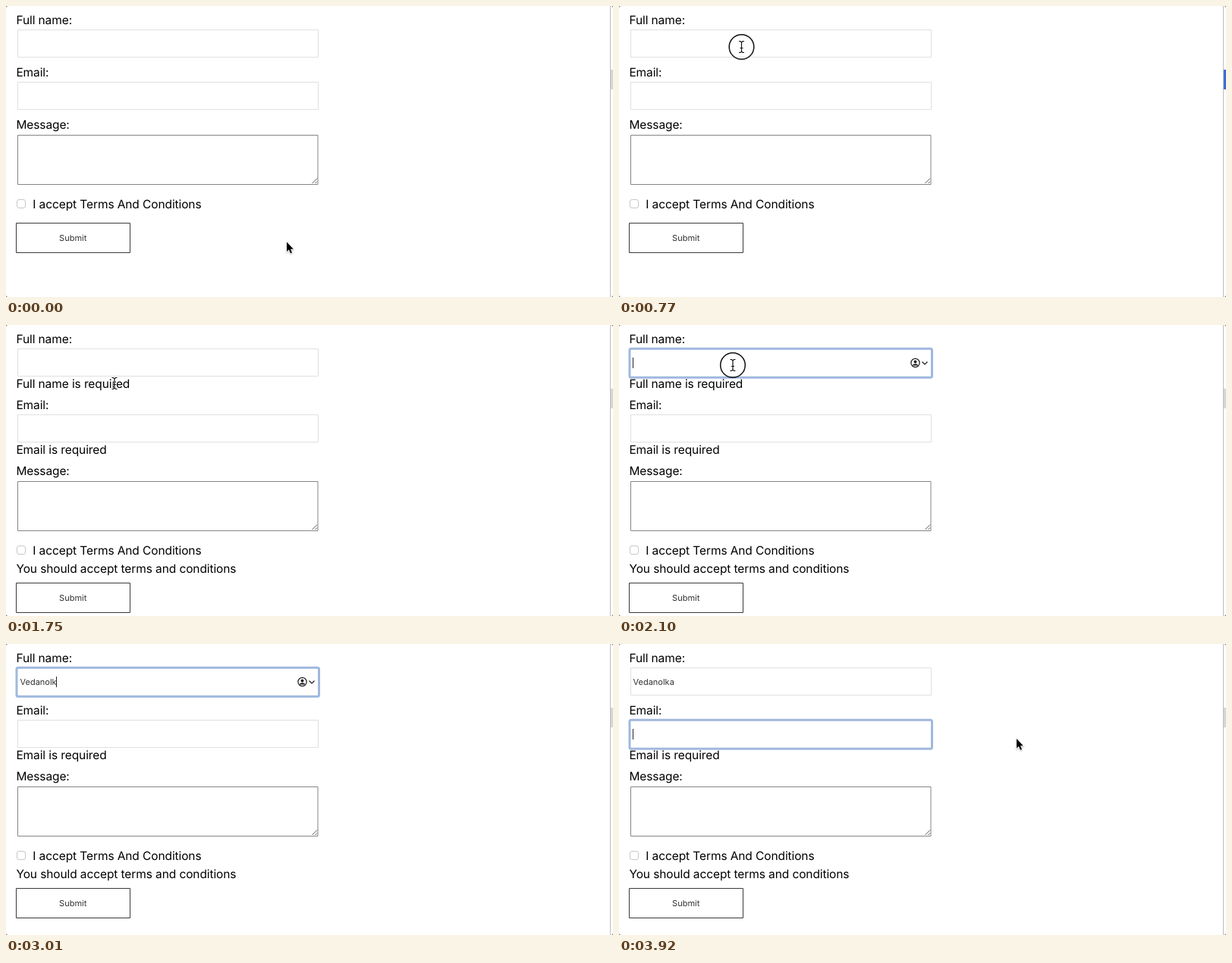
These frames come from a looping animation (800x384 px, 3.99 s). An HTML page with a canvas:

```html
<!DOCTYPE html>
<html lang="en">
<head>
<meta charset="utf-8">
<title>Form validation</title>
<style>
  html, body { margin: 0; width: 100%; height: 100%; overflow: hidden; background: #fff; }
  canvas { display: block; width: 800px; height: 384px; }
</style>
</head>
<body>
<canvas id="stage" width="800" height="384"></canvas>
<script>
const ctx = document.getElementById('stage').getContext('2d');
const WIDTH = 800, HEIGHT = 384, LOOP = 3990, STEP = 70;
const FONT = 'Inter, Roboto, sans-serif';
const LEFT = 13.4;
const NAME = 'Vedanolka';
const CLICK_TIME = 3 * STEP;

const typing = { start: 2240, end: 3080 };
const submitted = 1540;
const emailFocused = 3710;

// Pointer stops, each reached by an eased move from the one before
const origin = { x: 370, y: 311.5 };
const stops = [
  { leave: 0, arrive: 630, x: 161.5, y: 54, click: true },
  { leave: 980, arrive: 1330, x: 491, y: 191 },
  { leave: 1330, arrive: 1470, x: 112, y: 304, click: true },
  { leave: 1610, arrive: 1750, x: 143, y: 77 },
  { leave: 1750, arrive: 1960, x: 150, y: 53, click: true },
  { leave: 2940, arrive: 3570, x: 139.5, y: 118, click: true },
  { leave: emailFocused, arrive: 3920, x: 524, y: 125 }
];

const within = (t, from, to) => t >= from && t < to;
const clamp = v => Math.min(1, Math.max(0, v));
const ease = p => p * p * p * (p * (6 * p - 15) + 10);

function pointerAt(t) {
  let { x, y } = origin;
  for (const s of stops) {
    const k = ease(clamp((t - s.leave) / (s.arrive - s.leave)));
    x += (s.x - x) * k;
    y += (s.y - y) * k;
  }
  return { x, y };
}

// Typing starts slowly and speeds up
function typedName(t) {
  if (t < typing.start) return '';
  const p = clamp((t - typing.start) / (typing.end - typing.start));
  return NAME.slice(0, 1 + Math.floor((NAME.length - 1) * p ** 1.6 + 0.35));
}

function label(str, y, x = LEFT) {
  ctx.font = '15.5px ' + FONT;
  ctx.letterSpacing = '-0.1px';
  ctx.fillStyle = '#000';
  ctx.fillText(str, x, y);
}

function smallText(str, x, y) {
  ctx.font = '11px ' + FONT;
  ctx.letterSpacing = '0px';
  ctx.fillStyle = '#333';
  ctx.fillText(str, x, y);
  return ctx.measureText(str).width;
}

function box(x, y, w, h, color, width = 1, radius = 0) {
  ctx.strokeStyle = color;
  ctx.lineWidth = width;
  ctx.beginPath();
  ctx.roundRect(x, y, w, h, radius);
  ctx.stroke();
}

function circle(x, y, r) {
  ctx.beginPath();
  ctx.arc(x, y, r, 0, 2 * Math.PI);
}

function at(x, y, paint) {
  ctx.save();
  ctx.translate(x, y);
  paint();
  ctx.restore();
}

// One labelled input; returns the height taken and its text area
function field(y, { title, text = '', focused, caret, error }) {
  const top = y + 7;
  label(title, y);
  if (focused) box(14, top + 0.25, 398.5, 38, '#a0b8de', 3, 2);
  else box(15.5, top + 0.5, 396, 36, '#e0e0e0');
  const end = smallText(text, 18.5, top + 23);
  if (caret) {
    ctx.fillStyle = '#222';
    ctx.fillRect(Math.round(18 + end), top + 12, 1, 14);
  }
  if (error) label(error, y + 59);
  const extra = error ? 18 : 0;
  return { height: 69 + extra, top, bottom: top + 37 + extra };
}

const shoulders = new Path2D('M-3.5 3.4a3.5 2.1 0 0 1 7 0z');
const chevron = new Path2D('M9-1.5l3.5 3.5 3.5-3.5');

function contactIcon() {
  ctx.strokeStyle = ctx.fillStyle = '#1a1a1a';
  ctx.lineWidth = 1.2;
  circle(0, 0, 5.6);
  ctx.stroke();
  circle(0, -1.5, 1.9);
  ctx.fill();
  ctx.fill(shoulders);
  ctx.stroke(chevron);
}

function form(t) {
  const failed = t >= submitted;
  const nameFocus = within(t, 840, submitted) || within(t, 2100, emailFocused);
  const emailFocus = t >= emailFocused;

  let y = 24;
  const name = field(y, {
    title: 'Full name:',
    text: typedName(t),
    focused: nameFocus,
    caret: nameFocus && !within(t, 1330, submitted),
    error: failed && t < typing.start && 'Full name is required'
  });
  if (nameFocus) at(390.5, 50, contactIcon);
  y += name.height;

  const email = field(y, {
    title: 'Email:',
    focused: emailFocus,
    caret: emailFocus,
    error: failed && 'Email is required'
  });
  y += email.height;

  label('Message:', y);
  box(15.5, y + 8.5, 395.5, 65, '#858585');
  at(410, y + 72, () => {
    ctx.strokeStyle = '#555';
    ctx.stroke(new Path2D('M-6.5 0L0-6.5M-2.5 0L0-2.5'));
  });
  y += 105;

  box(14.5, y - 11.5, 11, 11, '#c8c8c8', 1, 2.5);
  label('I accept Terms And Conditions', y, 35.3);
  if (failed) {
    label('You should accept terms and conditions', y + 24);
    y += 18;
  }

  box(13.5, y + 19.5, 150, 39, '#3a3a3a');
  ctx.textAlign = 'center';
  smallText('Submit', 88.2, y + 43);
  ctx.textAlign = 'left';

  return [name, email];
}

const arrowShape = new Path2D('M0 0V12.6L2.9 10 5 14.8 7 13.9 5 9.2H8.8z');

function arrow() {
  ctx.shadowColor = 'rgba(0,0,0,0.3)';
  ctx.shadowBlur = 2;
  ctx.shadowOffsetY = 1;
  ctx.strokeStyle = '#fff';
  ctx.lineWidth = 1.5;
  ctx.stroke(arrowShape);
  ctx.shadowColor = 'transparent';
  ctx.fillStyle = '#000';
  ctx.fill(arrowShape);
}

const beamShape = new Path2D(
  'M-3.5-7.5h2L0-6 1.5-7.5h2M-3.5 7.5h2L0 6l1.5 1.5h2M0-6V6M-2 1.5h4');

function beam() {
  ctx.strokeStyle = 'rgba(255,255,255,0.8)';
  ctx.lineWidth = 2.6;
  ctx.stroke(beamShape);
  ctx.strokeStyle = '#111';
  ctx.lineWidth = 1.2;
  ctx.stroke(beamShape);
}

function pointer(t, fields) {
  // Hidden while typing
  if (within(t, typing.start, 3360)) return;
  const { x, y } = pointerAt(t);
  const overText = x < 412 && fields.some(f => within(y, f.top, f.bottom));
  at(x, y, overText ? beam : arrow);

  const click = stops.find(s => s.click && within(t, s.arrive, s.arrive + CLICK_TIME));
  if (!click) return;
  circle(x, y, 9 + 7.3 * (t - click.arrive) / (CLICK_TIME - STEP));
  ctx.strokeStyle = '#111';
  ctx.lineWidth = 1.5;
  ctx.stroke();
}

function windowEdge(t) {
  ctx.fillStyle = '#bdbdbd';
  ctx.fillRect(796, 0, 1, HEIGHT);
  ctx.fillStyle = within(t, 140, 840) ? '#3a6fd0' : '#d6d6d6';
  ctx.fillRect(797, 84, 3, 26);
  ctx.fillStyle = '#888';
  for (const x of [0, WIDTH])
    for (const y of [0, HEIGHT])
      at(x, y, () => ctx.fill(new Path2D('M-2 0L0-2 2 0 0 2z')));
}

function draw(now) {
  const t = Math.floor((now % LOOP) / STEP) * STEP;
  ctx.fillStyle = '#fff';
  ctx.fillRect(0, 0, WIDTH, HEIGHT);
  ctx.textRendering = 'geometricPrecision';
  windowEdge(t);
  pointer(t, form(t));
}

let start;
function tick(now) {
  start ??= now;
  draw(now - start);
  requestAnimationFrame(tick);
}
draw(0);
requestAnimationFrame(tick);
</script>
</body>
</html>
```
